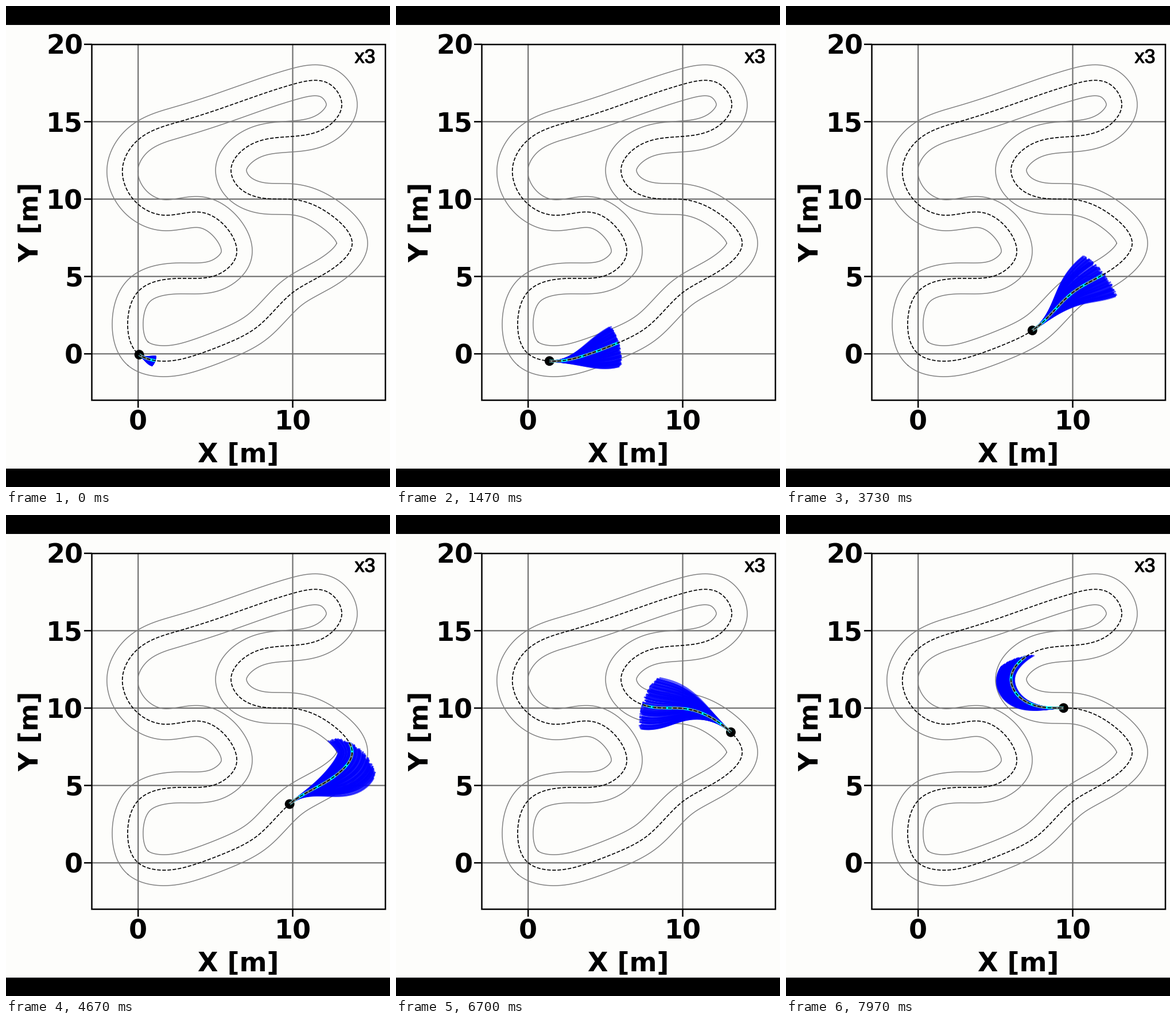
Recreate the animation shown at these times as a matplotlib script. Size 669x837 px, loop 8000 ms.

```python
import numpy as np
import matplotlib.pyplot as plt
from matplotlib.animation import FuncAnimation
from matplotlib.collections import LineCollection
from matplotlib.patches import Circle, Rectangle
import matplotlib.patheffects as pe

W, H, DPI = 669, 837, 64
PT = 72 / DPI          # points per pixel
FRAMES, INTERVAL = 250, 32
METRE = 26.93          # pixels, also half the track width
X0, Y0 = 230.2, 605.3  # pixel position of the plot origin
LEFT, RIGHT, TOP, BOTTOM = 149.5, 661, 67, 686

WAYPOINTS = np.array([
    (230, 605), (272, 618), (335, 606), (385, 587), (437, 559), (499, 499),
    (572, 455), (603, 415), (568, 365), (499, 336.5), (445, 334), (400, 309),
    (392, 286), (425, 242), (499, 227), (560, 210), (585, 172), (564, 136),
    (499, 136.5), (390, 173), (303, 201), (230, 233), (203, 282), (228, 343),
    (275, 364), (340, 359), (386, 388), (401, 435), (372, 466), (300, 474),
    (232, 495), (212, 550)])

# time in ms and car position
POSES = np.array([(0, 232, 606.5), (1470, 269.5, 620), (2570, 347, 602),
                  (3730, 430, 564), (5630, 577.5, 452), (6700, 582, 377),
                  (7970, 483, 338)])


def closed_spline(pts, n):
    """Periodic cubic spline through pts, resampled evenly by length."""
    k = len(pts)
    nxt = np.roll(pts, -1, 0)
    h = np.linalg.norm(nxt - pts, axis=1)
    d = (nxt - pts) / h[:, None]
    a = np.zeros((k, k))
    for i in range(k):
        a[i, i - 1] = h[i - 1]
        a[i, i] = 2 * (h[i - 1] + h[i])
        a[i, (i + 1) % k] = h[i]
    m = np.linalg.solve(a, 6 * (d - np.roll(d, 1, 0)))
    u = np.linspace(0, 1, 60, endpoint=False)[None, :, None]
    v = 1 - u
    c = v * pts[:, None] + u * nxt[:, None] + h[:, None, None]**2 / 6 * (
        (v**3 - v) * m[:, None] + (u**3 - u) * np.roll(m, -1, 0)[:, None])
    c = np.vstack([c.reshape(-1, 2), pts[:1]])
    s = np.r_[0, np.cumsum(np.linalg.norm(np.diff(c, axis=0), axis=1))]
    arc = np.linspace(0, s[-1], n)
    return arc, np.column_stack([np.interp(arc, s, c[:, j]) for j in (0, 1)])


arc, path = closed_spline(WAYPOINTS, 1500)
step = np.roll(path[:-1], -1, 0) - np.roll(path[:-1], 1, 0)
step = np.vstack([step, step[:1]])
heading = np.unwrap(np.arctan2(step[:, 1], step[:, 0]))
curvature = np.gradient(heading, arc)


def at(s, e=0):
    """Point at arc length s, shifted e pixels to the right of travel."""
    th = np.interp(s, arc, heading)
    return np.stack([np.interp(s, arc, path[:, 0]) - e * np.sin(th),
                     np.interp(s, arc, path[:, 1]) + e * np.cos(th)], axis=-1)


def border(side):
    edge = at(arc, side * METRE)
    gap = np.linalg.norm(edge[:, None] - path[None], axis=2).min(axis=1)
    edge = edge[gap > METRE - .4]
    return np.vstack([edge, edge[:1]])


def locate(x, y):
    half = path[:len(path) // 2]
    return arc[np.argmin(np.hypot(half[:, 0] - x, half[:, 1] - y))]


times = POSES[:, 0]
stops = np.array([locate(x, y) for _, x, y in POSES])
speed = np.gradient(stops, times)
speed[0] = 0           # starts from rest


def travelled(t):
    i = int(np.clip(np.searchsorted(times, t) - 1, 0, len(times) - 2))
    h = times[i + 1] - times[i]
    u = (t - times[i]) / h
    v = 1 - u
    return (v * v * ((1 + 2 * u) * stops[i] + u * h * speed[i])
            + u * u * ((3 - 2 * u) * stops[i + 1] - v * h * speed[i + 1]))


fig = plt.figure(figsize=(W / DPI, H / DPI), dpi=DPI, facecolor="black")
ax = fig.add_axes([0, 0, 1, 1])
ax.set_xlim(0, W)
ax.set_ylim(H, 0)
ax.axis("off")
ax.add_patch(Rectangle((0, 32.5), W, 772, fc="#fdfdfb", ec="none", zorder=0))


def line(x, y, color, width, z, **kw):
    return ax.plot(x, y, color=color, lw=width * PT, zorder=z, snap=False,
                   **kw)[0]


def text(x, y, s, size=46, weight="bold", **kw):
    ax.text(x, y, s, fontsize=size * PT, weight=weight, ha="left",
            va="baseline", zorder=9, **kw)


for value in range(0, 21, 5):
    y = Y0 - METRE * value
    if value < 20:
        line([LEFT, RIGHT], [y, y], "#707070", 2.2, 1)
    line([136, LEFT], [y, y], "black", 2.5, 2, solid_capstyle="butt")
    text(134 - 32 * len(str(value)), y + 17, str(value))
for value in (0, 10):
    x = X0 + METRE * value
    line([x, x], [TOP, BOTTOM], "#707070", 2.2, 1)
    line([x, x], [BOTTOM, 699], "black", 2.5, 2, solid_capstyle="butt")
    text(x - 16 * len(str(value)), 737.5, str(value))
ax.add_patch(Rectangle((LEFT, TOP), RIGHT - LEFT, BOTTOM - TOP, fill=False,
                       ec="black", lw=2.5 * PT, zorder=8, snap=False))
text(334.3, 793.5, "X [m]")
text(56, 445.5, "Y [m]", rotation=90, rotation_mode="anchor")
text(607.5, 99, "x3", 34, "normal", family="Liberation Sans",
     path_effects=[pe.withStroke(linewidth=1.1 * PT, foreground="black")])

for side in (-1, 1):
    line(*border(side).T, "#808080", 1.5, 2)

fan = LineCollection([], colors=[(0, 0, 1, .65)], linewidths=2.8 * PT,
                     capstyle="butt", zorder=3)
ax.add_collection(fan, autolim=False)
car = ax.add_patch(Circle((0, 0), 8.4, fc="black", ec="none", zorder=4))
target = line([], [], "cyan", 4.8, 5, solid_capstyle="butt")
plan = line([], [], "#808080", 4.2, 6, ls=(0, (5, 2.4)), dash_capstyle="butt")
line(*path.T, "black", 1.7, 7, ls="--")

COUNT, STEPS = 120, 26
U = np.linspace(0, 1, STEPS)


def rollouts(s, length, rng):
    """Sampled drives that swing wide on the outside of the bend ahead."""
    turn = np.interp(s + length, arc, heading) - np.interp(s, arc, heading)
    bend = abs(turn)
    half = length * max(.58 - .062 * bend**2, .15) / 2
    w = np.linspace(-1, 1, COUNT) + rng.normal(0, .02, COUNT) - .25 * turn
    shape = (1 - np.cos(np.pi * U * (.85 + .15 * bend))) / 2
    e = half * w[:, None] * shape
    ds = length / (STEPS - 1) * rng.uniform(.98, 1.02, COUNT)
    along = np.full((COUNT, STEPS), s)
    for k in range(1, STEPS):
        # constant speed, so wide lines gain less along the track
        forward = np.sqrt(np.maximum(ds**2 - (e[:, k] - e[:, k - 1])**2, 0))
        kappa = np.interp(along[:, k - 1], arc, curvature)
        along[:, k] = along[:, k - 1] + forward / np.maximum(
            1 - kappa * e[:, k - 1], .6)
    return at(along, e)


def update(i):
    t = i * INTERVAL
    s = travelled(t)
    length = 30 + 135 * (1 - np.exp(-t / 1200))
    fan.set_segments(list(rollouts(s, length, np.random.default_rng(i))))
    ahead = at(s + np.linspace(0, length, 60))
    car.center = tuple(ahead[0])
    target.set_data(*ahead.T)
    plan.set_data(*ahead.T)
    return fan, car, target, plan


anim = FuncAnimation(fig, update, frames=FRAMES, interval=INTERVAL,
                     init_func=lambda: update(0), repeat=True, repeat_delay=0,
                     blit=False)
plt.show()
```
